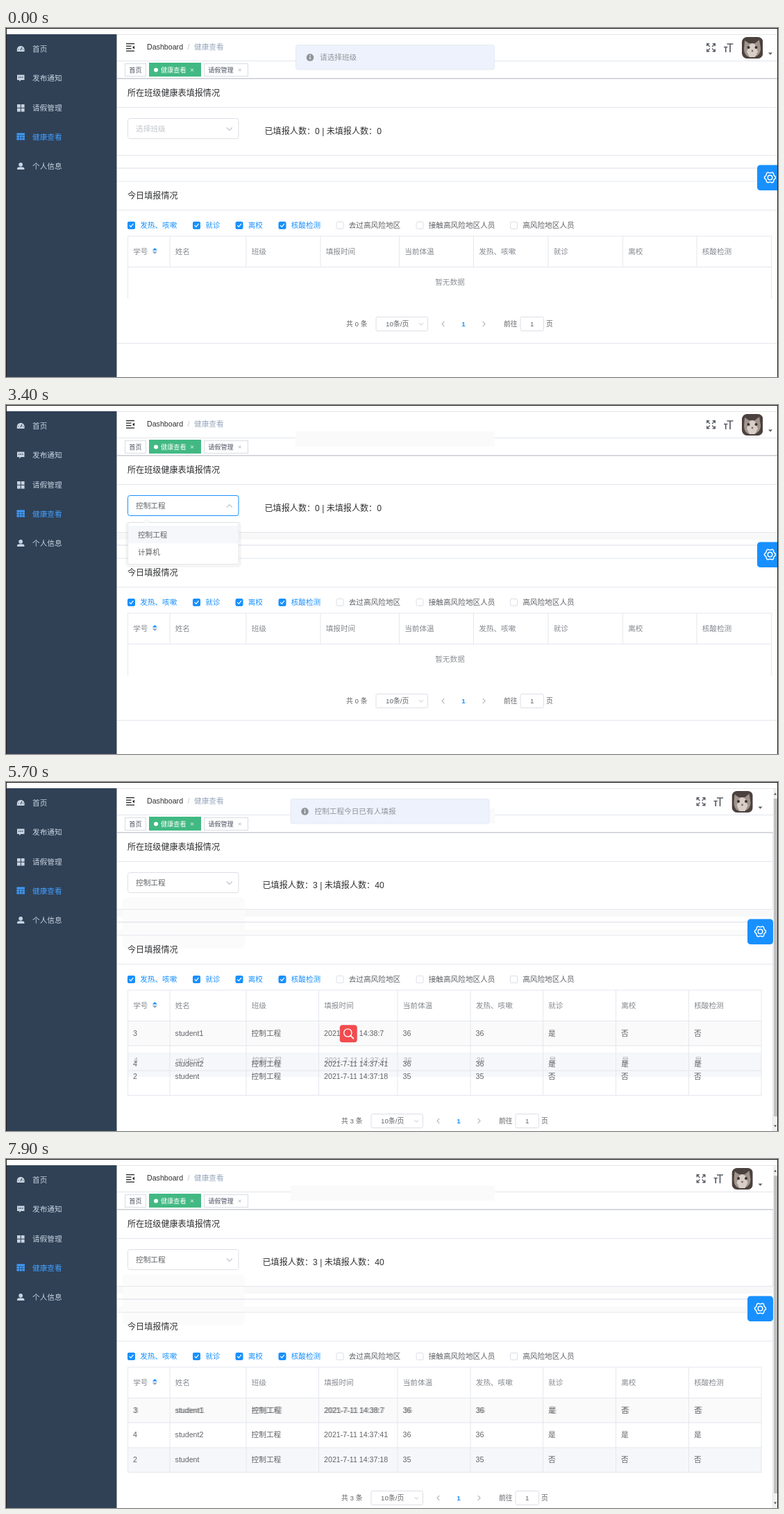
Animation of 1112 by 503 pixels, one loop 8 s. Source, as an HTML page:

```html
<!DOCTYPE html>
<html lang="zh-CN">
<head>
<meta charset="utf-8">
<title>健康查看</title>
<style>
html, body { margin: 0; width: 100%; height: 100%; overflow: hidden; background: #fff; }
svg { display: block; font-family: "Liberation Sans", "Noto Sans CJK SC", "Noto Sans CJK", sans-serif; font-size: 10.65px; }
</style>
</head>
<body>
<svg id="stage" width="1112" height="503" viewBox="0 0 1112 503"></svg>
<script>
const LOOP = 8000;
const BLUE = '#1890ff', INK = '#303133', BODY = '#606266', GREY = '#909399', PALE = '#c0c4cc', LINE = '#e4e7ee';
const FIELD = '#dcdfe6';

// markup helpers
const text = (x, y, s, fill = BODY, more = '') => `<text x="${x}" y="${y}" fill="${fill}" ${more}>${s}</text>`;
const rect = (x, y, w, h, fill, more = '') => `<rect x="${x}" y="${y}" width="${w}" height="${h}" fill="${fill}" ${more}/>`;
const box = (x, y, w, h, stroke, r = 2, fill = '#fff', more = '') =>
  rect(x + .5, y + .5, w - 1, h - 1, fill, `rx="${r}" stroke="${stroke}" ${more}`);
const path = (d, stroke, w = 1, more = '') => `<path d="${d}" fill="none" stroke="${stroke}" stroke-width="${w}" ${more}/>`;
const solid = (d, fill) => `<path d="${d}" fill="${fill}"/>`;
const dot = (x, y, r, fill) => `<circle cx="${x}" cy="${y}" r="${r}" fill="${fill}"/>`;
const group = (id, body, more = '') => `<g id="${id}" ${more}>${body}</g>`;
const hline = (x, y, w, c = LINE) => rect(x, y, w, 1, c);
const vline = (x, y, h, c = LINE) => rect(x, y, 1, h, c);

function sidebar() {
  const c = '#c8d3e0', on = '#409eff';
  const items = [['首页', 34], ['发布通知', 76], ['请假管理', 119], ['健康查看', 160.5], ['个人信息', 203]];
  const icons =
    solid('M15.8 34V31a5.4 5.2 0 0 1 10.8 0v3z', c) + path('M21 32l2-4M17.5 31h1M24 31h1', '#304156', 1.1) +
    solid('M16 67.5h10.5v7.5h-5l-2.2 2.3V75H16z', c) + path('M18 71h1.4M20.5 71h1.4M23 71h1.4', '#304156', 1.3) +
    [[16, 110], [21.8, 110], [16, 115.8], [21.8, 115.8]].map(p => rect(p[0], p[1], 4.8, 4.8, c)).join('') +
    rect(15.5, 151.5, 11.5, 10, on) + path('M15.5 154.7h11.5M15.5 158.2h11.5M19.5 155v7M23.2 155v7', '#304156', .7) +
    dot(21.2, 196.8, 2.9, c) + solid('M16 204v-1.4q0-2.4 5.2-2.4t5.2 2.4V204z', c);
  return rect(1, 9, 158.5, 494, '#304156') + icons +
    items.map((it, i) => text(38, it[1], it[0], i === 3 ? on : c)).join('');
}

function header() {
  const ham = path('M173 22.7h12M173 26.2h7.5M173 29.7h7.5M173 33.2h12', '#222', 1.2) + solid('M185 25.5v5l-3-2.5z', '#222');
  const tag = 'font-size="9.15"';
  return hline(160, 9, 951, '#e6e6e6') + ham +
    text(203, 31, 'Dashboard', INK) + text(261.5, 31, '/', PALE) + text(271, 31, '健康查看', '#97a8be') +
    hline(160, 47, 951, '#e3e6ec') + rect(160, 72, 951, 1.6, '#cdd0d6') +
    box(171, 51, 31, 19, '#d8dce5', 0) + text(177.3, 64, '首页', '#495060', tag) +
    rect(206, 50, 75, 20, '#42b983') + dot(216, 60.5, 3, '#fff') +
    text(223, 64, '健康查看', '#fff', tag + ' font-weight="500"') + path('M266 58.5l4 4m0-4l-4 4', '#fff', .9) +
    box(285, 51, 64, 19, '#d8dce5', 0) + text(291.2, 64, '请假管理', '#495060', tag) +
    path('M335 58.7l3.6 3.6m0-3.6l-3.6 3.6', '#9a9fa8', .8);
}

function tools() {
  const c = '#5a5e66';
  const arrows = [[1, 1, 1009, 22], [-1, 1, 1022, 22], [1, -1, 1009, 34.5], [-1, -1, 1022, 34.5]]
    .map(([sx, sy, x, y]) => `<g transform="translate(${x} ${y}) scale(${sx} ${sy})">` +
      path('M.7 4.3V.7H4.3M.9.9l4 4', c, 1.4) + '</g>').join('');
  const letters = path('M1038.5 23h9M1043 23v12M1034 27.5h5.4M1036.7 27.5v7.5', c, 1.7);
  const cat = '<g clip-path="url(#face)">' + rect(1060, 13, 30, 31, '#4b413e') +
    solid('M1063 29l1-11 6 4h9l6-5 2 12q0 12-12 13t-12-13z', '#a2948d') +
    solid('M1071 24l4-2 4 2 4 10-4 8h-8l-4-8z', '#d9cfc9') +
    dot(1069.5, 28, 2, '#3a3231') + dot(1080.5, 28, 2, '#3a3231') + dot(1075, 33, 1.4, '#8a6a64') + '</g>';
  return arrows + letters + cat + solid('M1098 35.5h6l-3 3.2z', c);
}

function gear() {
  let d = '';
  for (let i = 0; i < 72; i++) {
    const a = i * Math.PI / 36, r = 7.3 + .75 * Math.cos(6 * a);
    d += (i ? 'L' : 'M') + (1100.5 + r * Math.cos(a)).toFixed(2) + ' ' + (215.5 + r * Math.sin(a)).toFixed(2);
  }
  return rect(1082, 197.5, 37, 36.5, BLUE, 'rx="4.5"') + path(d + 'Z', '#fff', 1.5) +
    '<circle cx="1100.5" cy="215.5" r="3.3" fill="none" stroke="#fff" stroke-width="1.5"/>';
}

function checks() {
  const items = [[175, '发热、咳嗽'], [269, '就诊'], [330.5, '离校'], [392.5, '核酸检测'],
    [475.5, '去过高风险地区'], [590.5, '接触高风险地区人员'], [726, '高风险地区人员']];
  return items.map(([x, s], i) => {
    const on = i < 4;
    return box(x, 279, 11, 11, on ? BLUE : FIELD, 1.5, on ? BLUE : '#fff') +
      (on ? path(`M${x + 2.7} 284.4l2.1 2.2 3.6-4.4`, '#fff', 1.2) : '') +
      text(x + 18.2, 287.5, s, on ? BLUE : BODY);
  }).join('');
}

const HEADS = ['学号', '姓名', '班级', '填报时间', '当前体温', '发热、咳嗽', '就诊', '离校', '核酸检测'];
const WIDE = [175, 235.5, 345.5, 452.5, 566, 673, 780.5, 888, 994.5, 1102];
const SLIM = [175, 235.5, 345.5, 450, 563.5, 668.5, 773, 878, 983, 1087.5];

const heads = cols => HEADS.map((s, i) => text(cols[i] + 8.2, 325.5, s, '#85888e', 'font-weight="500"')).join('') +
  solid('M210.7 320.6h7.2l-3.6-3.6z', BLUE) + solid('M210.7 322.2h7.2l-3.6 3.6z', '#8fa6c0');
// inner column lines stop at inner, the outer two at bottom
const grid = (cols, inner, bottom) =>
  cols.map((x, i) => vline(x, 300, (i % 9 ? inner : bottom) - 300)).join('') +
  hline(175, 299.5, cols[9] - 174) + hline(175, 344, cols[9] - 174);

const ROWS = {
  2: ['student', '14:37:18', 35, '否', '否', '否'],
  3: ['student1', '14:38:7', 36, '是', '否', '否'],
  4: ['student2', '14:37:41', 36, '是', '是', '是']
};
const IDS = Object.keys(ROWS);
function rowText(id) {
  const [name, time, temp, a, b, c] = ROWS[id];
  return [id, name, '控制工程', '2021-7-11 ' + time, temp, temp, a, b, c]
    .map((s, i) => text(SLIM[i] + 8.1, 365.8, s)).join('');
}

function pager(count) {
  const f = 'font-size="9.84"', mid = 'text-anchor="middle"';
  return text(490, 430, `共 ${count} 条`, BODY, f) +
    box(532.5, 416, 75.5, 21, FIELD, 2) + text(547, 430, '10条/页', BODY, f) +
    path('M595 425.2l3 3 3-3', PALE, 1) +
    path('M631.3 423l-3.2 3.5 3.2 3.5M686.7 423l3.2 3.5-3.2 3.5', '#a9adb5', 1.1) +
    text(659, 430, '1', BLUE, f + ' font-weight="bold" ' + mid) +
    text(717, 430, '前往', BODY, f) + box(740.5, 416, 34.5, 21, FIELD, 2) +
    text(757.8, 430, '1', BODY, f + ' ' + mid) + text(778, 430, '页', BODY, f);
}

const toast = s => box(417, 24, 287, 36.5, '#e6eaf3', 3, '#edf2fc') + dot(438, 42.4, 5.3, GREY) +
  path('M438 41.6v3.6M438 39v1.4', '#fff', 1.3) + text(452, 46, s, GREY);

const menu = () => rect(172, 168, 167, 66, '#000', 'rx="5" opacity=".04"') +
  box(175, 169, 160.5, 61, '#e4e7ed', 3) + solid('M198 169.6l4.5-4.5 4.5 4.5z', '#fff') +
  path('M198 169.5l4.5-4.5 4.5 4.5', '#e4e7ed') + rect(176, 174, 158.5, 25.5, '#f5f7fa') +
  text(190, 190.7, '控制工程') + text(190, 216.3, '计算机');

const finder = () => rect(0, 0, 25, 25, '#f24b4f', 'rx="4"') +
  '<circle cx="11.6" cy="11.2" r="5.6" fill="none" stroke="#fff" stroke-width="1.4"/>' +
  path('M15.6 15.4l4 4', '#fff', 1.9, 'stroke-linecap="round"');

const stage = document.getElementById('stage');
stage.innerHTML = '<defs><clipPath id="face"><rect x="1060" y="13" width="30.5" height="31" rx="7.5"/></clipPath></defs>' +
  rect(0, 0, 1112, 503, '#fff') +
  rect(160, 184, 951, 10, '#f8f8f8', 'id="shade1"') + rect(160, 213, 951, 7, '#fafafa', 'id="shade2"') +
  rect(168, 166, 176, 74, '#fbfbfb', 'rx="6" id="trace"') +
  header() + group('tools', tools()) +
  text(175, 98.2, '所在班级健康表填报情况', INK, 'font-size="12.1"') +
  hline(160, 114, 951) + hline(160, 183, 951) + hline(160, 201.5, 951, '#d8dce5') + hline(160, 220.5, 951) +
  text(175, 245.7, '今日填报情况', INK, 'font-size="12.1"') + hline(160, 262, 951) +
  box(175, 130, 160.5, 30, FIELD, 3, '#fff', 'id="field"') + text(187, 148.8, '', PALE, 'id="value"') +
  group('chevron', path('M-4 -2l4 4 4-4', PALE, 1.1)) +
  text(372.5, 152.9, '', INK, 'id="stat" font-size="12.1"') + checks() +
  group('before', heads(WIDE) + grid(WIDE, 344, 390) + text(639.5, 370, '暂无数据', GREY, 'text-anchor="middle"') +
    pager(0) + hline(160, 454, 951)) +
  group('after', heads(SLIM) +
    IDS.map(id => rect(175, 345, 913, 35.5, '#fff', `id="fill${id}"`)).join('') +
    IDS.map(id => group('row' + id, rowText(id))).join('') +
    grid(SLIM, 451.5, 451.5) + [379.5, 415.5, 451].map(y => hline(175, y, 913.5)).join('') +
    IDS.map(id => group('ghost' + id, rowText(id))).join('') +
    group('pager3', pager(3), 'transform="translate(-7 62)"') +
    vline(1104, 74, 109) + vline(1104, 221, 282) +
    rect(1105, 10, 6, 493, '#f1f1f1') + rect(1106, 24, 5, 458, '#c1c1c1') +
    solid('M1106 18.5h4l-2-3zM1106 494.5h4l-2 3z', '#555')) +
  group('gear', gear()) + rect(417, 38, 287, 22, '#fafafa', 'id="residue"') +
  group('toast1', toast('请选择班级')) + group('toast2', toast('控制工程今日已有人填报')) +
  group('menu', menu()) + group('finder', finder()) + sidebar() +
  rect(0, 0, 1112, 1, '#111') + rect(0, 0, 1, 503, '#222') + rect(1111, 0, 1, 503, '#222');

const el = {};
stage.querySelectorAll('[id]').forEach(n => el[n.id] = n);

// timing helpers
const span = (t, a, b) => Math.min(1, Math.max(0, (t - a) / (b - a)));
const ease = p => p * p * (3 - 2 * p);
const lerp = (a, b, p) => a + (b - a) * p;
const set = (id, o) => { for (const k in o) el[id].setAttribute(k, o[k]); };
const show = (id, on) => set(id, { display: on ? 'inline' : 'none' });
const shift = (id, x, y) => set(id, { transform: `translate(${x} ${y})` });
const mix = (a, b, p) => 'rgb(' + a.map((v, i) => Math.round(lerp(v, b[i], p))) + ')';

const ORDERS = [[0, '234'], [4850, '324'], [5600, '342'], [5850, '432'], [6600, '423'], [7400, '432'], [7500, '342']];
const SLOT = 35.7;

const DRAGS = [
  { id: 2, icon: [4700, 5100], ghost: [4800, 5100], move: [4750, 5050], slots: [0, 1], from: [484, 325], to: [484, 361] },
  { id: 4, icon: [5300, 6300], ghost: [5400, 6150], move: [5350, 6100], slots: [2, 0], from: [483, 372], to: [478, 324] },
  { id: 2, icon: [6400, 6800], ghost: [6500, 6800], move: [6450, 6750], slots: [2, 1], from: [480, 396], to: [480, 362] },
  { id: 3, icon: [7200, 7600], ghost: [7400, 8000], move: [7340, 7620], slots: [2, 0], from: [482, 397], to: [485, 343] }
];
const within = (t, [a, b]) => t >= a && t < b;

function rowSlot(id, t) {
  let pos = 0;
  ORDERS.forEach(([at, order], i) => {
    const slot = order.indexOf(id);
    pos = i ? lerp(pos, slot, ease(span(t, at, at + 150))) : slot;
  });
  return pos;
}

function rowFill(id, t) {
  if (within(t, [5850, 6350])) return '#f8f8f9';
  const hover = within(t, [5100, 5850]) ? 4 : within(t, [6750, 7150]) || t >= 7600 ? 2 : 0;
  return +id === hover ? '#f5f7fa' : id === '3' ? '#fafafa' : '#fff';
}

function fadeToast(id, t, x, enter, leave) {
  const e = ease(span(t, enter, enter + 250)), p = span(t, leave, leave + 250);
  set(id, { opacity: e * Math.pow(1 - p, 2.3) });
  shift(id, x, -36 * (1 - e) - 35 * p);
}

function draw(t) {
  const loaded = t >= 3500, picked = t >= 3400;
  show('before', !loaded);
  show('after', loaded);
  shift('tools', loaded ? -14.5 : 0, 0);
  shift('gear', loaded ? -14 : 0, 0);
  show('shade1', t >= 2300);
  show('shade2', t >= 4600);
  show('trace', t >= 3700);
  show('residue', t >= 2400);
  set('residue', loaded ? { x: 409.5, width: 294.5 } : { x: 417, width: 287 });

  const grey = [220, 223, 230], dim = [192, 196, 204], blue = [24, 144, 255];
  set('field', { stroke: t >= 4600 ? FIELD : t < 2500 ? mix(grey, dim, span(t, 2100, 2400)) : mix(dim, blue, span(t, 2500, 2750)) });
  el.value.textContent = picked ? '控制工程' : '选择班级';
  set('value', { fill: picked ? BODY : PALE });
  const open = ease(span(t, 2600, 2900)) * (1 - ease(span(t, 3400, 3700)));
  set('chevron', { transform: `translate(321.8 145.5) rotate(${180 * open})` });
  set('menu', { opacity: open, transform: `translate(0 ${166 * (1 - open)}) scale(1 ${Math.max(open, .01)})` });
  el.stat.textContent = loaded ? '已填报人数：3 | 未填报人数：40' : '已填报人数：0 | 未填报人数：0';
  set('stat', { x: loaded ? 369.5 : 372.5 });

  fadeToast('toast1', t, 0, -900, 2080);
  fadeToast('toast2', t, -7.5, 3500, 6050);

  for (const id of IDS) {
    const y = SLOT * rowSlot(id, t);
    shift('row' + id, 0, y);
    shift('fill' + id, 0, y);
    set('fill' + id, { fill: rowFill(id, t) });
    show('ghost' + id, false);
  }
  show('finder', false);
  for (const d of DRAGS) {
    const p = ease(span(t, ...d.move));
    if (within(t, d.icon)) {
      show('finder', true);
      shift('finder', lerp(d.from[0], d.to[0], p), lerp(d.from[1], d.to[1], p));
    }
    if (within(t, d.ghost)) {
      show('ghost' + d.id, true);
      set('ghost' + d.id, { opacity: .5 });
      shift('ghost' + d.id, 2 * p, SLOT * lerp(...d.slots, p));
    }
  }
}

function tick() {
  draw(performance.now() % LOOP);
  requestAnimationFrame(tick);
}
tick();
</script>
</body>
</html>
```
